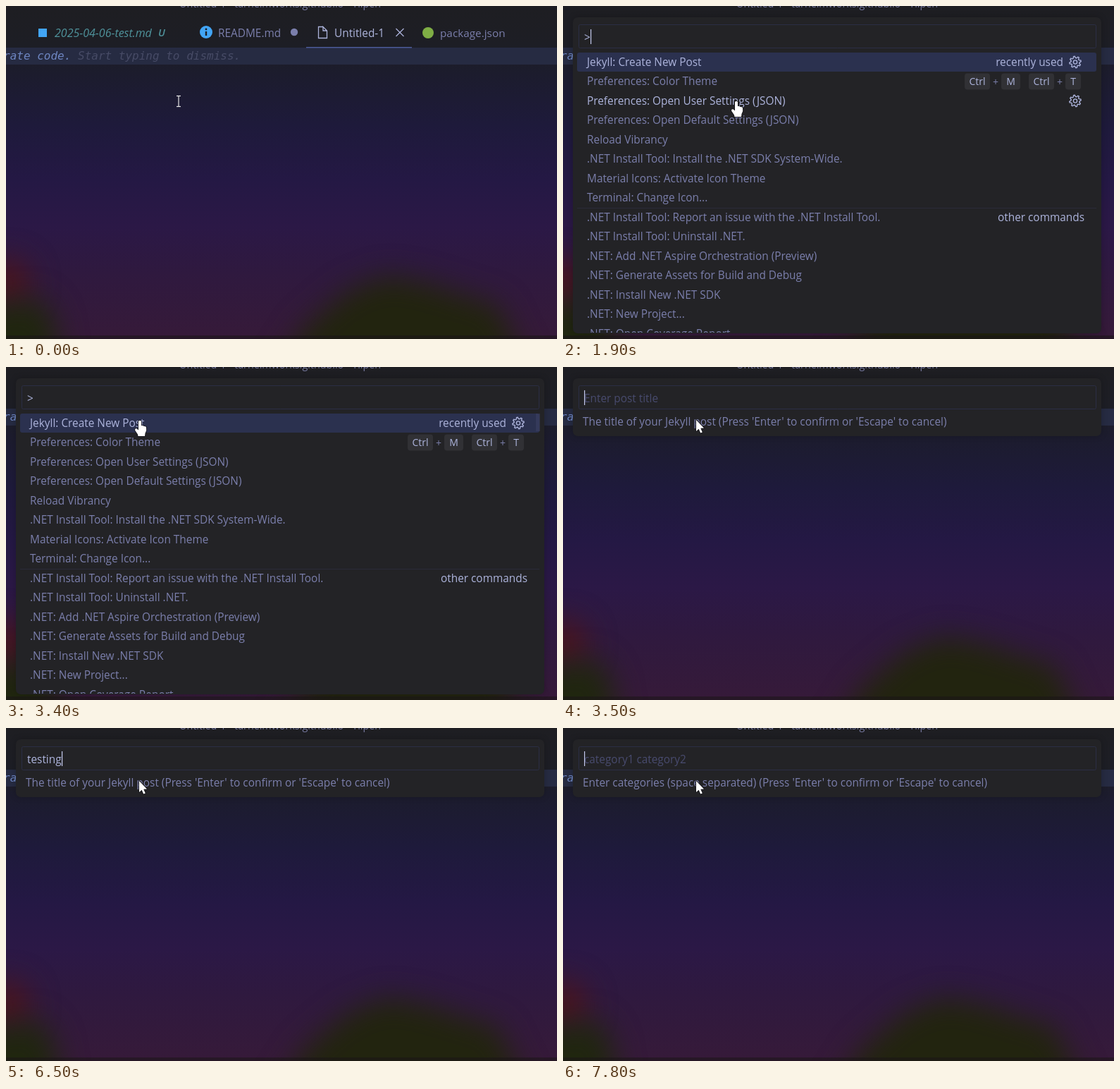
Recreate the animation shown at these times as an HTML page with a canvas. Size 782x472 px, loop 8000 ms.

```html
<!DOCTYPE html>
<html lang="en">
<head>
<meta charset="utf-8">
<title>Command palette</title>
<style>
  html, body { margin: 0; width: 100%; height: 100%; overflow: hidden; background: #1d1d22; }
  canvas { display: block; }
</style>
</head>
<body>
<canvas id="stage" width="782" height="472"></canvas>
<script>
const W = 782, H = 472, LOOP = 8000;
const UI = '"Open Sans", "Noto Sans", sans-serif';
const MONO = '"DejaVu Sans Mono", monospace';
const SIZE = 15.39;
const BRIGHT = '#adb4dc', DIM = '#7b7fac', FAINT = '#484b6e', BLUE = '#42a5f5';
const ROW_TOP = 66, ROW_H = 27.5;
const commands = [
  'Jekyll: Create New Post',
  'Preferences: Color Theme',
  'Preferences: Open User Settings (JSON)',
  'Preferences: Open Default Settings (JSON)',
  'Reload Vibrancy',
  '.NET Install Tool: Install the .NET SDK System-Wide.',
  'Material Icons: Activate Icon Theme',
  'Terminal: Change Icon...',
  '.NET Install Tool: Report an issue with the .NET Install Tool.',
  '.NET Install Tool: Uninstall .NET.',
  '.NET: Add .NET Aspire Orchestration (Preview)',
  '.NET: Generate Assets for Build and Debug',
  '.NET: Install New .NET SDK',
  '.NET: New Project...',
  '.NET: Open Coverage Report'
];

const screen = document.getElementById('stage').getContext('2d');
let g = screen;

function text(str, x, y, color, { size = SIZE, style = '', family = UI, align = 'left' } = {}) {
  g.font = `${style} ${size}px ${family}`;
  g.textAlign = align;
  g.fillStyle = color;
  g.fillText(str, x, y);
}

function rect(x, y, w, h, color, radius = 0) {
  g.fillStyle = color;
  g.beginPath();
  g.roundRect(x, y, w, h, radius);
  g.fill();
}

function disc(x, y, r, color) {
  g.fillStyle = color;
  g.beginPath();
  g.arc(x, y, r, 0, 2 * Math.PI);
  g.fill();
}

function trace(points, close) {
  g.beginPath();
  points.forEach(([x, y]) => g.lineTo(x, y));
  if (close) g.closePath();
}

function stroke(color, width) {
  g.strokeStyle = color;
  g.lineWidth = width;
  g.stroke();
}

function wallpaper() {
  const sky = g.createLinearGradient(0, 0, 0, H);
  [[0, '#1e1e22'], [.12, '#1d1e25'], [.2, '#1c1c2d'], [.36, '#1e1a3b'], [.52, '#241844'],
   [.66, '#2b1846'], [.8, '#2f193f'], [1, '#361a39']].forEach(s => sky.addColorStop(...s));
  rect(0, 0, W, H, sky);

  g.filter = 'blur(20px)';
  disc(0, 393, 34, '#4a151e');
  g.fillStyle = '#20260f';
  trace([[-60, 430], [10, 420], [42, 412], [66, 436], [84, 540], [-60, 540]], true);
  g.fill();
  g.fillStyle = '#22240f';
  trace([[370, 540], [425, 454], [485, 404], [540, 382], [595, 392], [650, 410],
         [698, 424], [752, 540]], true);
  g.fill();
  g.filter = 'none';
  rect(0, 467, W, 5, 'rgba(27,20,23,.55)');
}

function tabs() {
  text('Untitled-1 - tarnelmworks.github.io - Tilpen', 389, 2, '#777aa0', { size: 14.3, align: 'center' });

  rect(46, 32, 12, 12, BLUE);
  text('2025-04-06-test.md', 69, 44, '#4f929b', { size: 16, style: 'italic' });
  text('U', 216, 43, '#4f929b', { size: 14.5, style: 'italic 600' });

  disc(284, 37, 9, BLUE);
  disc(284, 33, 1.4, '#1d1d22');
  rect(282.8, 36, 2.4, 6, '#1d1d22');
  text('README.md', 301, 44, DIM);
  disc(409, 37, 5.2, DIM);

  trace([[450, 29.5], [443.5, 29.5], [443.5, 45.5], [455.5, 45.5], [455.5, 35], [450, 29.5],
         [450, 35], [455.5, 35]]);
  stroke(BRIGHT, 1.3);
  text('Untitled-1', 466, 44, BRIGHT);
  trace([[553.5, 32], [564.5, 43]]);
  stroke(BRIGHT, 1.3);
  trace([[564.5, 32], [553.5, 43]]);
  stroke(BRIGHT, 1.3);
  rect(426, 58, 150, 1.4, '#4c5c99');

  disc(599, 38, 8, '#7fae45');
  text('package.json', 616, 44, DIM, { size: 15.3 });
}

function editor() {
  wallpaper();
  rect(0, 59, W, 24, '#262b42');
  const mono = { size: 16, style: 'italic', family: MONO };
  text('rate code.', -4, 76, '#6e86c2', mono);
  text('Start typing to dismiss.', 102, 76, '#474b66', mono);
  tabs();
}

function panel(height) {
  g.save();
  g.shadowColor = 'rgba(0,0,0,.22)';
  g.shadowBlur = 10;
  rect(14, 16, 750, height, '#232326', 7);
  g.restore();
  g.beginPath();
  g.roundRect(22.5, 26.5, 734, 33, 2);
  stroke('#2b2e45', 1);
}

function field(value, caretOn, hint = '') {
  if (!value) text(hint, 30, 50, FAINT);
  text(value, 30, 50, BRIGHT);
  if (caretOn) rect(30 + Math.round(g.measureText(value).width), 33, 1.2, 21, '#c3c9ec');
}

function gear(x, y) {
  const points = [];
  for (let i = 0; i < 32; i++) {
    const a = (i - 1.5) * Math.PI / 16;
    const r = i % 4 < 2 ? 8.2 : 6;
    points.push([x + r * Math.cos(a), y + r * Math.sin(a)]);
  }
  trace(points, true);
  stroke(BRIGHT, 1.4);
  g.beginPath();
  g.arc(x, y, 2.6, 0, 2 * Math.PI);
  stroke(BRIGHT, 1.4);
}

function shortcut(dx, y) {
  const small = { size: 14, align: 'center' };
  [['Ctrl', 570, 36], ['M', 622, 27], ['Ctrl', 661, 36], ['T', 713, 22]].forEach(([key, x, w]) => {
    rect(x + dx, y - 11.5, w, 23, '#313135', 4);
    text(key, x + dx + w / 2, y + 5, BRIGHT, small);
  });
  [614, 705].forEach(x => text('+', x + dx, y + 6, DIM, small));
}

function palette(hover, caretOn, scrollbar) {
  panel(448);
  field('>', caretOn);
  g.save();
  g.beginPath();
  g.rect(14, 60, 750, 403);
  g.clip();
  rect(20, ROW_TOP, 737, 27, '#2b314f', 3);
  rect(20, 286, 737, 1, '#2a2b39');
  commands.forEach((name, i) => {
    const y = ROW_TOP + 13.5 + i * ROW_H;
    const active = i === 0 || i === hover;
    text(name, 34, Math.round(y + 5.4), active ? BRIGHT : DIM);
    if (active) gear(727, y);
    if (i === 1) shortcut(active ? -30 : 0, y);
  });
  text('recently used', 710, 85, BRIGHT, { align: 'right' });
  text('other commands', 740, 305, BRIGHT, { align: 'right' });
  rect(752, ROW_TOP, 6, 25, `rgba(64,70,105,${.45 * scrollbar})`);
  g.restore();
}

function prompt(message, hint, value, caretOn) {
  panel(82);
  field(value, caretOn, hint);
  text(message, 28, 83, DIM);
}

function beam(x, y) {
  trace([[x - 3, y - 7.5], [x + 3, y - 7.5]]);
  stroke('#e8e8e8', 1.2);
  trace([[x, y - 7.5], [x, y + 7.5]]);
  stroke('#e8e8e8', 1.2);
  trace([[x - 3, y + 7.5], [x + 3, y + 7.5]]);
  stroke('#e8e8e8', 1.2);
}

function pointer(shape, x, y) {
  g.save();
  g.translate(x, y);
  g.lineJoin = 'round';
  trace(shape, true);
  stroke('#15151a', 1.6);
  g.fillStyle = '#fff';
  g.fill();
  g.restore();
}

const ARROW = [[0, 0], [0, 16], [3.6, 12.7], [6.2, 18.6], [8.8, 17.4], [6.3, 11.7], [11, 11.4]];
const HAND = [[-2, 1], [-.8, 0], [.8, 0], [2, 1], [2, 7], [4.5, 7], [5.5, 8], [8, 8.3], [9, 9.5],
              [9.2, 14], [7.5, 18], [7, 22], [-2.5, 22], [-3, 19.5], [-7, 13.5], [-6.5, 11.5],
              [-4.5, 11.3], [-2, 13.5]];

const clamp = v => Math.min(1, Math.max(0, v));
const blink = (elapsed, half) => Math.floor(Math.max(0, elapsed) / half) % 2 === 0;

function draw(t) {
  g.drawImage(backdrop, 0, 0);
  if (t < 1900) return beam(245, 135);

  if (t < 3500) {
    const p = clamp((t - 2600) / 700);
    const k = p * p * (3 - 2 * p);
    const x = 246 - 56 * k, y = 135 - 59 * k;
    palette(Math.floor((y - ROW_TOP) / ROW_H), blink(t - 1900, 500), clamp((t - 2600) / 300));
    return pointer(HAND, x, y);
  }

  if (t < 6700) {
    const typed = Math.max(0, Math.floor((t - 5590) / 110));
    prompt("The title of your Jekyll post (Press 'Enter' to confirm or 'Escape' to cancel)",
      'Enter post title', 'testing'.slice(0, typed), t > 5575 || blink(t - 3455, 530));
  } else {
    prompt("Enter categories (space separated) (Press 'Enter' to confirm or 'Escape' to cancel)",
      'category1 category2', '', blink(t - 6800, 500));
  }
  pointer(ARROW, 189, 75);
}

const backdrop = document.createElement('canvas');
backdrop.width = W;
backdrop.height = H;
g = backdrop.getContext('2d');
editor();
g = screen;

function frame() {
  draw(performance.now() % LOOP);
  requestAnimationFrame(frame);
}
frame();
</script>
</body>
</html>
```
